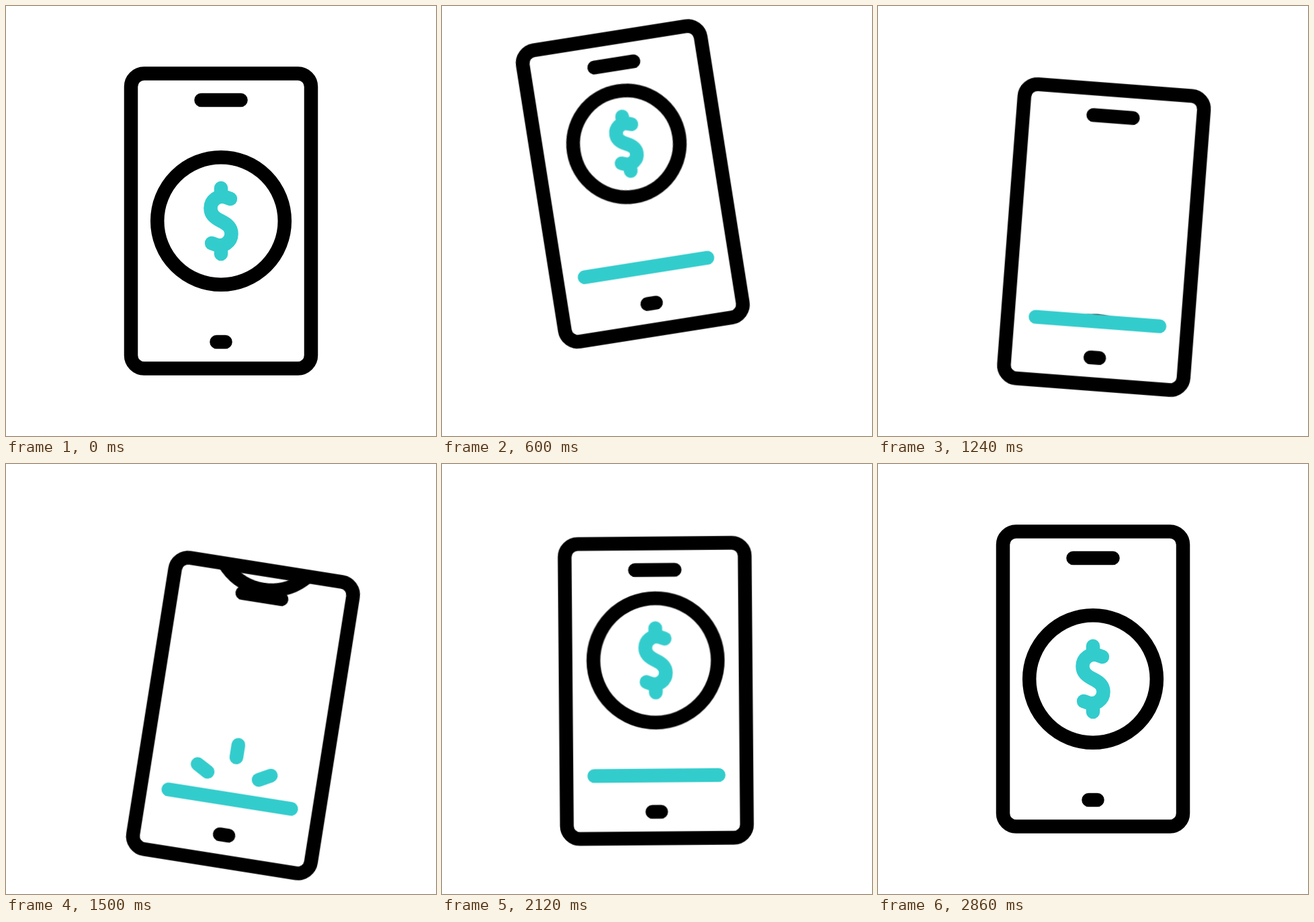
Recreate the animation shown at these times as an HTML page. Size 640 px wide and 640 px high, loop 3000 ms.

```html
<!DOCTYPE html>
<html lang="en">
<head>
<meta charset="utf-8">
<title>Mobile payment</title>
<style>
  html, body { margin: 0; width: 100%; height: 100%; overflow: hidden; background: #fff; }
  svg { display: block; width: 640px; height: 640px; }

  .line { fill: none; stroke: #000; stroke-width: 20.5; stroke-linecap: round; stroke-linejoin: round; }
  .teal { stroke: #3cc; }
  .rigid { vector-effect: non-scaling-stroke; }

  .lift, .tilt, .coin-out, .coin-in, .bar, .ray {
    animation: 3s cubic-bezier(.37, 0, .63, 1) infinite;
  }
  .lift { animation-name: lift; }
  .tilt { animation-name: tilt; transform-origin: 186px 540px; }
  .coin-out { animation-name: coin-out; }
  .coin-in { animation-name: coin-in; }
  .bar { animation-name: bar; }
  .ray { animation-name: ray; }

  @keyframes lift {
    0%, 88%, 100% { transform: translateY(0); }
    18.667%, 24.667% { transform: translateY(-37px); }
    50% { transform: translateY(30.7px); }
    57.833% { transform: translateY(30.5px); }
  }

  /* The phone swings about its lower left corner and settles. */
  @keyframes tilt {
    0%, 88%, 100% { transform: rotate(0deg); }
    18.667%, 24.667% { transform: rotate(-9deg); }
    50% { transform: rotate(9deg); }
    57.833% { transform: rotate(-5.1deg); }
    65.667% { transform: rotate(5.1deg); }
    73.167% { transform: rotate(-2.25deg); }
    80.5% { transform: rotate(2.1deg); }
  }

  @keyframes coin-out {
    0% { transform: translate(320px, 320px) scale(1); }
    20%, 24.667% { transform: translate(320px, 259.6px) scale(.837); }
    50%, 100% { transform: translate(320px, 617px) scale(.837); }
  }

  @keyframes coin-in {
    0%, 41.333% { transform: translate(320px, 14px) scale(.837); }
    80.667%, 100% { transform: translate(320px, 320px) scale(1); }
  }

  @keyframes bar {
    0%, 7.333%, 83.5%, 100% { transform: translate(320px, 446px) scaleX(0); }
    20%, 70.667% { transform: translate(320px, 446px) scaleX(1); }
    0%, 83.5% { visibility: hidden; }
    7.333%, 70.667% { visibility: visible; }
  }

  /* Each ray grows outward, then shrinks to a dot at its outer end. */
  @keyframes ray {
    0%, 42% { stroke-dasharray: 0 300; stroke-dashoffset: 0; }
    52% { stroke-dasharray: 100 300; stroke-dashoffset: 0; }
    62.6%, 100% { stroke-dasharray: 0 300; stroke-dashoffset: -99; }
    0%, 62.61%, 100% { opacity: 0; }
    41.99% { opacity: 0; }
    42%, 62.6% { opacity: 1; }
    0% { animation-timing-function: step-end; }
  }
</style>
</head>
<body>
<svg viewBox="0 0 640 640">
  <defs>
    <clipPath id="screen"><rect x="186" y="100.5" width="268" height="345.5"/></clipPath>
    <g id="coin" class="line">
      <circle class="rigid" r="94.8"/>
      <path class="rigid teal" d="M0-49V-38M0 49V38M14-33L7-35.5C-4-39-15.5-31-15.5-19C-15.5-10-10-5 0 0C10 5 15.5 10 15.5 19C15.5 31 4 39-7 35.5L-14 33"/>
    </g>
  </defs>
  <g class="lift">
    <g class="tilt">
      <g clip-path="url(#screen)">
        <g class="coin-out"><use href="#coin"/></g>
        <g class="coin-in"><use href="#coin"/></g>
      </g>
      <g class="line">
        <rect x="186" y="100.5" width="268" height="439" rx="19.5"/>
        <path d="M290.5 140H349.5M313.5 500H326.5"/>
      </g>
      <g class="line teal">
        <path class="ray" pathLength="100" d="M281 411L263 401"/>
        <path class="ray" pathLength="100" d="M320 383V362.5"/>
        <path class="ray" pathLength="100" d="M358 411L376.5 401"/>
        <path class="bar rigid" d="M-92.5 0H92.5"/>
      </g>
    </g>
  </g>
</svg>
</body>
</html>
```
